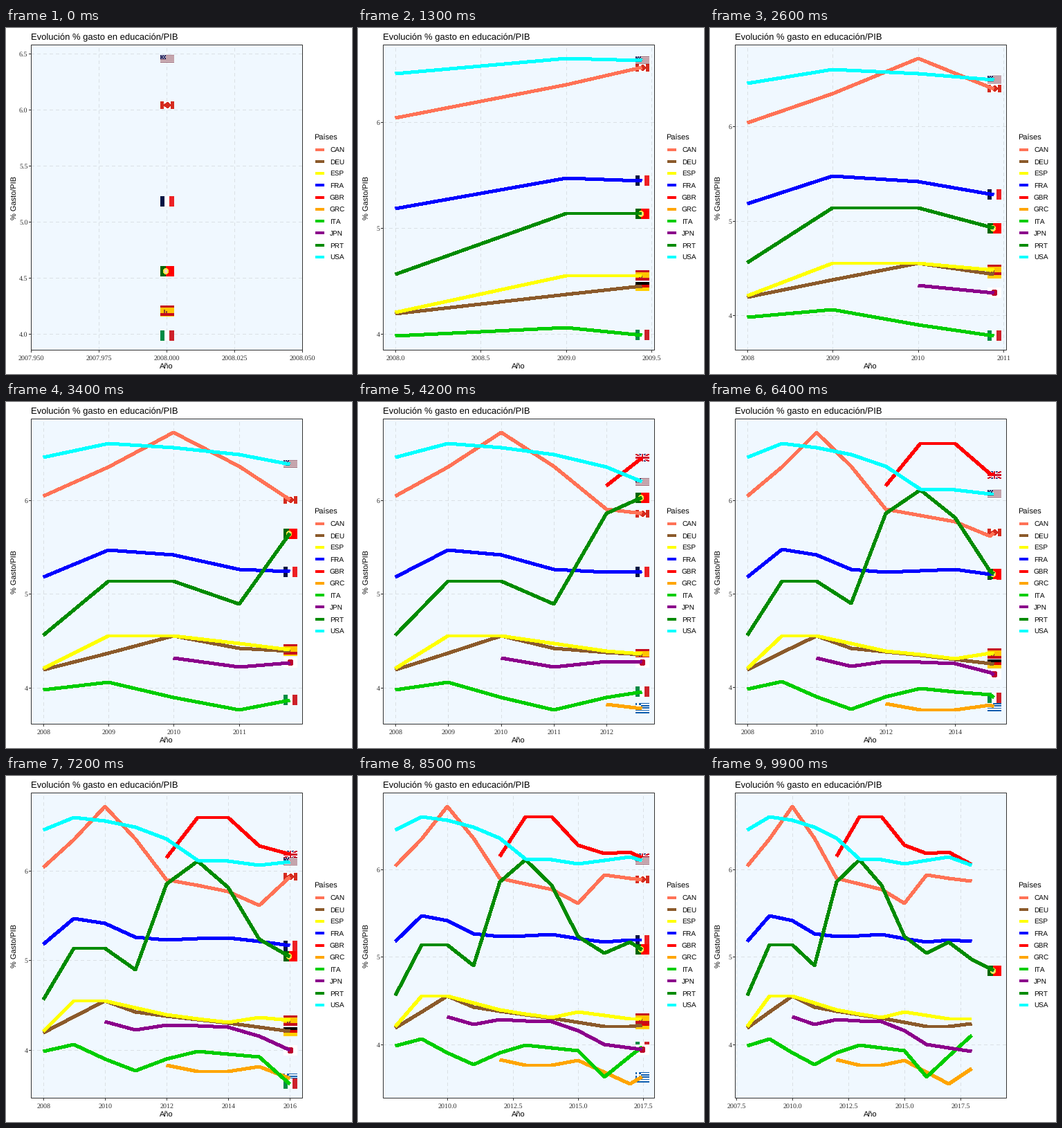
Write a matplotlib script that moves like this. It is 500 by 500 pixels and loops after 10 s.

```python
import math

import matplotlib.pyplot as plt
import numpy as np
from matplotlib.animation import FuncAnimation
from matplotlib.collections import PolyCollection
from matplotlib.patches import Rectangle

SIZE, DPI = 500, 100
FRAMES, STEP_MS = 100, 100
PT = 72 / DPI  # points per pixel
LEFT, RIGHT, TOP, BOTTOM = 36, 428, 24, 465
FLAG_W = 20
STRETCH = (BOTTOM - TOP) / (RIGHT - LEFT)
SANS, SERIF = "Liberation Sans", "Liberation Serif"
_ = np.nan  # a year on the straight line between its neighbours

plt.rcParams.update({"path.snap": False, "text.hinting": "none",
                     "text.hinting_factor": 1})

# country: line colour, first year, key points of the yearly share
SERIES = {
    "CAN": ("#FF7256", 2008, [6.04, 6.35, 6.72, 6.36, 5.9, _, 5.77, 5.615, 5.935, _, 5.865]),
    "DEU": ("#8B5A2B", 2008, [4.19, _, 4.55, 4.42, _, _, 4.3, _, 4.205, 4.205, 4.235]),
    "ESP": ("#FFFF00", 2008, [4.205, 4.55, 4.55, _, 4.39, _, 4.305, 4.365, _, 4.29, 4.29]),
    "FRA": ("#0000FF", 2008, [5.18, 5.47, 5.415, 5.26, 5.23, _, 5.255, _, 5.165, 5.195, 5.18]),
    "GBR": ("#FF0000", 2012, [6.15, 6.6, 6.6, 6.28, 6.185, 6.2, 6.055]),
    "GRC": ("#FFA500", 2012, [3.825, 3.76, 3.76, 3.815, _, 3.545, 3.72]),
    "ITA": ("#00CD00", 2008, [3.98, 4.06, 3.9, 3.765, 3.9, 3.985, _, 3.925, 3.62, _, 4.1]),
    "JPN": ("#8B008B", 2010, [4.315, 4.225, 4.28, _, 4.255, 4.155, 3.995, _, 3.915]),
    "PRT": ("#008B00", 2008, [4.56, 5.135, 5.135, 4.895, 5.855, 6.11, 5.815, 5.235, 5.045,
                              5.17, 4.97, 4.84]),
    "USA": ("#00FFFF", 2008, [6.455, 6.6, 6.56, 6.485, 6.355, 6.115, 6.11, 6.06, _, 6.145,
                              6.045]),
}


# Flag parts: (colour, points in the unit square, y down)
def box(color, x0=0, y0=0, x1=1, y1=1):
    return color, [(x0, y0), (x1, y0), (x1, y1), (x0, y1)]


def disc(color, cx, r, sides=24):
    a = np.linspace(0, 2 * math.pi, sides, endpoint=False)
    return color, [(cx + r / 1.5 * math.cos(t), .5 + r * math.sin(t)) for t in a]


def bands(*colors):
    n = len(colors)
    return [box(c, x0=i / n, x1=(i + 1) / n) for i, c in enumerate(colors)]


def stripes(*colors):
    n = len(colors)
    return [box(c, y0=i / n, y1=(i + 1) / n) for i, c in enumerate(colors)]


def cross(color, cx, cy, w, h, x1=1, y1=1):
    return [box(color, cx - w, 0, cx + w, y1), box(color, 0, cy - h, x1, cy + h)]


def saltire(color, a, b):
    down = [(0, 0), (a, 0), (1, 1 - b), (1, 1), (1 - a, 1), (0, b)]
    return [(color, down), (color, [(1 - x, y) for x, y in down])]


def usa():
    stars = [box("#C8C8DC", x / 20, y / 12, (x + 1) / 20, (y + 1) / 12)
             for y in range(1, 6, 2) for x in range(1 + y % 4, 8, 3)]
    return (stripes(*(["#8A4A5A", "white"] * 6)[:11])
            + [box("#2B2B60", x1=.4, y1=6 / 11)] + stars)


def britain():
    return ([box("#00145F")] + saltire("white", .13, .24) + saltire("#CF142B", .04, .08)
            + cross("white", .5, .5, .09, .18) + cross("#CF142B", .5, .5, .05, .1))


def greece():
    blue = "#0D5EAF"
    return (stripes(*([blue, "white"] * 5)[:9]) + [box(blue, x1=.37, y1=5 / 9)]
            + cross("white", .185, 2.5 / 9, .04, .5 / 9, x1=.37, y1=5 / 9))


RED = "#D52B1E"
FLAGS = {  # height / width, parts
    "CAN": (1 / 2, bands(RED, "white", "white", RED) + [disc(RED, .52, .4, 4)]),
    "DEU": (3 / 5, stripes("black", "#DD0000", "#FFCE00")),
    "ESP": (2 / 3, stripes("#C60B1E", "#FFC400", "#FFC400", "#C60B1E")
            + [box("#8A4030", .28, .42, .34, .7), box("#8A4030", .42, .55, .48, .7)]),
    "FRA": (2 / 3, bands("#001444", "white", "#ED2024")),
    "GBR": (1 / 2, britain()),
    "GRC": (2 / 3, greece()),
    "ITA": (2 / 3, bands("#008C45", "white", "#CD212A")),
    "JPN": (2 / 3, [box("white"), disc("#BC002D", .5, .3)]),
    "PRT": (2 / 3, [box("#FF0000"), box("#006600", x1=.4), disc("#F5E23C", .4, .25),
                    disc("#F4D9C0", .4, .13)]),
    "USA": (10 / 19, usa()),
}


def nice_breaks(lo, hi, m=5):
    """Extended Wilkinson labelling, limited to the visible range."""
    nice = [1, 5, 2, 2.5, 4, 3]
    best, found = -2, (lo, hi - lo, 2)
    for j in (1, 2):
        for i, q in enumerate(nice):
            simple = 1 - i / (len(nice) - 1) - j
            for k in range(2, 12):
                dense_max = 2 - (k - 1) / (m - 1) if k >= m else 1
                if .25 * simple + .25 + .5 * dense_max < best:
                    continue
                z0 = math.ceil(math.log10((hi - lo) / (k + 1) / j / q))
                for z in (z0, z0 + 1):
                    step = j * q * 10.0 ** z
                    first = math.floor(hi / step) * j - (k - 1) * j
                    for s in range(first, math.ceil(lo / step) * j + 1):
                        a = s * step / j
                        b = a + step * (k - 1)
                        cover = 1 - .5 * ((hi - b) ** 2 + (lo - a) ** 2) / (.1 * (hi - lo)) ** 2
                        ratio = (k - 1) / (b - a) * (max(b, hi) - min(a, lo)) / (m - 1)
                        dense = 2 - max(ratio, 1 / ratio)
                        score = .25 * simple + .2 * cover + .5 * dense + .05
                        if score > best + 1e-9:
                            best, found = score, (a, step, k)
    a, step, k = found
    eps = 1e-6 * (hi - lo)
    return [v for v in (a + step * n for n in range(k)) if lo - eps <= v <= hi + eps]


def labels(values):
    digits = next(d for d in range(6)
                  if d == 5 or all(abs(round(v, d) - v) < 1e-6 for v in values))
    return [f"{v:.{digits}f}" for v in values]


def expand(lo, hi):
    pad = .05 * (hi - lo) or .05
    return lo - pad, hi + pad


def snap(v):
    return np.floor(np.asarray(v) + .5)


fig = plt.figure(figsize=(SIZE / DPI, SIZE / DPI), dpi=DPI, facecolor="white")
ax = fig.add_axes([0, 0, 1, 1])


def text(x, y, s, px, font=SANS, color="black", **kw):
    ax.text(x, y, s, fontsize=px * PT, family=font, color=color, **kw)


def thick(xs, ys, color):
    ax.plot(snap(xs), snap(ys), color=color, lw=4 * PT, zorder=4, antialiased=False,
            solid_capstyle="butt", solid_joinstyle="round")


def thin(xs, ys, color, z, **kw):
    ax.plot(snap(xs) + .5, snap(ys) + .5, color=color, lw=PT, zorder=z,
            antialiased=False, solid_capstyle="butt", **kw)


def flag(code, x, y):
    ratio, parts = FLAGS[code]
    h = int(FLAG_W * ratio * STRETCH + 1e-6)
    corner = snap([x - FLAG_W / 2 + 1, y - h / 2])
    polys = [np.array(p) * (FLAG_W, h) + corner for _c, p in parts]
    ax.add_collection(PolyCollection(polys, facecolors=[c for c, _p in parts], zorder=3,
                                     edgecolors="none", antialiaseds=False), autolim=False)


def frame_and_legend():
    panel = dict(xy=(LEFT + .5, TOP + .5), width=RIGHT - LEFT, height=BOTTOM - TOP)
    ax.add_patch(Rectangle(**panel, fc="#F0F8FF", ec="none", zorder=0))
    ax.add_patch(Rectangle(**panel, fc="none", ec="#333333", lw=PT, zorder=5))
    text(35.7, 17, "Evolución % gasto en educación/PIB", 13)
    text((LEFT + RIGHT) / 2, 493, "Año", 11, ha="center")
    text(15.5, (TOP + BOTTOM) / 2 + .5, "% Gasto/PIB", 11, rotation=90,
         rotation_mode="anchor", ha="center")
    text(445, 161, "Países", 11)
    for n, (code, (color, *_rest)) in enumerate(SERIES.items()):
        y = 175.5 + 17.28 * n
        thick([447, 460], [y, y], color)
        text(468, snap(y) + 4, code, 9.6)


def axes_ticks(xlim, ylim, px, py):
    grid = dict(color="#DAE0E5", z=1, dashes=(5, 5))
    tick = dict(color="#333333", z=2)
    label = dict(px=10, font=SERIF, color="#303030")
    xs, ys = nice_breaks(*xlim), nice_breaks(*ylim)
    for v, s in zip(xs, labels(xs)):
        x = px(v)
        thin([x, x], [BOTTOM, TOP], **grid)
        thin([x, x], [BOTTOM, BOTTOM + 3], **tick)
        text(x + .5, 479.5, s, ha="center", **label)
    for v, s in zip(ys, labels(ys)):
        y = py(v)
        thin([LEFT, RIGHT], [y, y], **grid)
        thin([LEFT - 3, LEFT], [y, y], **tick)
        text(31.5, snap(y) + 4, s, ha="right", **label)


def reveal(first, values, now):
    """Points passed so far, ending at the interpolated current one."""
    if now < first - 1e-9:
        return None
    values = np.array(values)
    years = first + np.arange(len(values))
    known = ~np.isnan(values)
    end = min(now, years[-1])
    xs = np.append(years[years < end - 1e-9], end)
    return xs, np.interp(xs, years[known], values[known])


def draw(i):
    ax.clear()
    ax.set(xlim=(0, SIZE), ylim=(SIZE, 0))
    ax.axis("off")
    now = 2008 + 11 * i / (FRAMES - 1)
    paths = {c: reveal(f, v, now) for c, (_c, f, v) in SERIES.items()}
    paths = {c: p for c, p in paths.items() if p}
    seen = np.concatenate([y for _x, y in paths.values()])
    xlim, ylim = expand(2008, now), expand(seen.min(), seen.max())

    def px(v):
        return LEFT + (v - xlim[0]) / (xlim[1] - xlim[0]) * (RIGHT - LEFT)

    def py(v):
        return BOTTOM - (v - ylim[0]) / (ylim[1] - ylim[0]) * (BOTTOM - TOP)

    frame_and_legend()
    axes_ticks(xlim, ylim, px, py)
    for code, (xs, ys) in paths.items():
        if xs[-1] > now - 1e-6:
            flag(code, px(xs[-1]), py(ys[-1]))
        if len(xs) > 1:
            thick(px(xs), py(ys), SERIES[code][0])
    return []


anim = FuncAnimation(fig, draw, frames=FRAMES, interval=STEP_MS, repeat=True)
plt.show()
```
